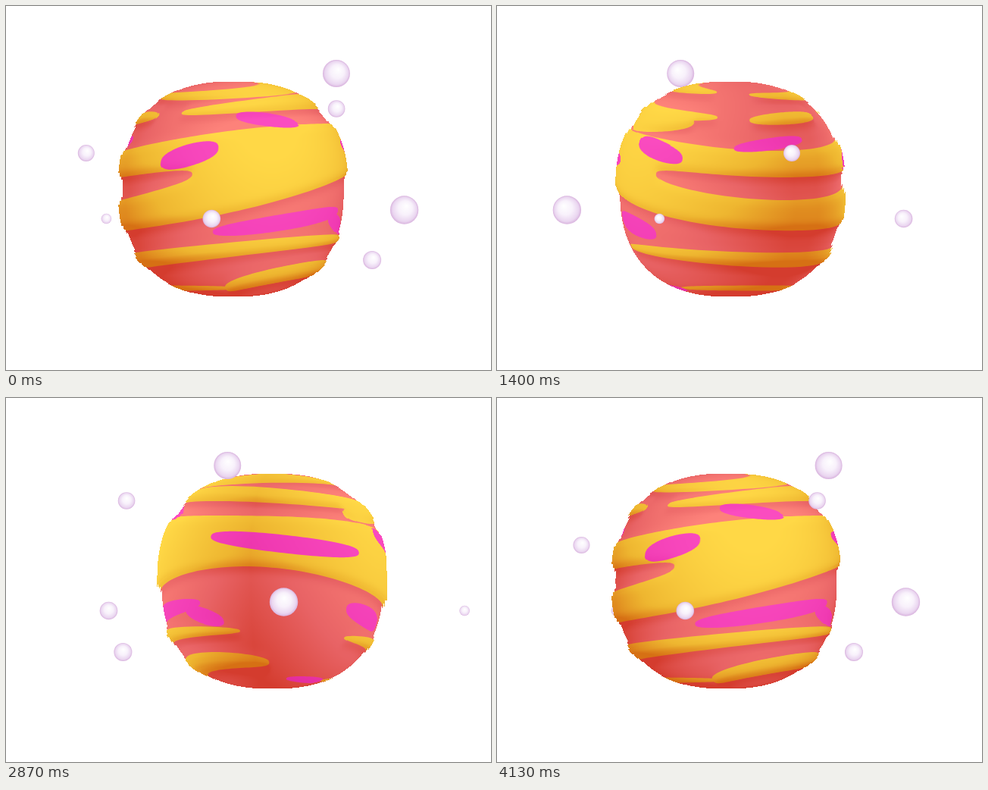
Animation of 640 by 480 pixels, one loop 4.2 s. Source, as an HTML page with a canvas:

```html
<!DOCTYPE html>
<html>
<head>
<meta charset="utf-8">
<title>Striped planet</title>
<style>
  html, body { margin: 0; width: 100%; height: 100%; overflow: hidden; background: #fff; }
  canvas { display: block; }
</style>
</head>
<body>
<canvas id="stage" width="640" height="480"></canvas>
<script>
const LOOP = 4200, STEP = 70, TAU = 2 * Math.PI;
const CY = 241.5, RX = 146, RY = 142, ROUND = 2.4, RELIEF = 7;
const ctx = document.getElementById('stage').getContext('2d');
const sin = deg => Math.sin(deg * TAU / 360), cos = deg => Math.cos(deg * TAU / 360);

// Surface map: x is longitude (padded by 20 degrees each side), y is the stage row
const SCALE = 3, PAD = 20, TOP = 90, MAP_W = (360 + 2 * PAD) * SCALE, MAP_H = 300;

function layer(w, h) {
  const c = document.createElement('canvas');
  c.width = w;
  c.height = h;
  return c.getContext('2d', { willReadFrequently: true });
}

const plot = (g, lon, y) => g.lineTo((lon + 180 + PAD) * SCALE, y - TOP);

// Rounded streak along the wave y + amp * sin(lon - phase)
function streak(g, mid, span, y, half, amp, phase = mid) {
  for (const shift of [-360, 0, 360]) {
    g.beginPath();
    for (let a = 0; a < 360; a += 3) {
      const lon = mid - span * cos(a), s = sin(a);
      plot(g, lon + shift, y + amp * sin(lon - phase) + half * Math.sign(s) * Math.abs(s) ** 0.75);
    }
    g.fill();
  }
}

// Wide belt running all the way round between two waves
const beltTop = lon => 169.5 - 18 * cos(lon - 84) - 3.5 * cos(2 * lon + 10);
const beltBottom = lon => 263 - 37 * cos(lon - 98) + 4 * cos(2 * lon - 30);

const stripes = layer(MAP_W, MAP_H);
stripes.beginPath();
for (let lon = -210; lon <= 210; lon += 3) plot(stripes, lon, beltTop(lon));
for (let lon = 210; lon >= -210; lon -= 3) plot(stripes, lon, beltBottom(lon));
stripes.fill();
stripes.globalCompositeOperation = 'destination-out';
streak(stripes, -91, 70, 212, 15, 29, -181);
stripes.globalCompositeOperation = 'source-over';
streak(stripes, 62, 165, 112, 7, 7, 210);
streak(stripes, 98, 134, 137, 10, 11, 165);
streak(stripes, 190, 28, 153, 13, 0);
streak(stripes, -82, 26, 148, 8, -7);
streak(stripes, -52, 148, 321, 10, -14, 0);
streak(stripes, -86, 96, 372, 3.5, 0);
streak(stripes, 52, 60, 371, 12, -25, -5);

const spots = layer(MAP_W, MAP_H);
streak(spots, -23.5, 16, 197, 15, -36);
streak(spots, -161, 16, 190, 13, 42);
streak(spots, -97, 21, 182, 8, -17);
streak(spots, 122, 42, 193, 12, 16);
streak(spots, 22, 20, 150, 9, 14);
streak(spots, 31, 42, 284, 11, -21);
streak(spots, 74, 13, 287, 11, 35);
streak(spots, 176, 19, 289, 14, 34);
streak(spots, 154, 26, 371.5, 4, 4);

const swell = layer(MAP_W, MAP_H);
swell.filter = 'blur(6px)';
swell.drawImage(stripes.canvas, 0, 0);

const alphaOf = g => g.getImageData(0, 0, MAP_W, MAP_H).data.filter((_, i) => i % 4 == 3);
const stripeMap = alphaOf(stripes), spotMap = alphaOf(spots), heightMap = alphaOf(swell);

const near = (map, u, v) => map[(v | 0) * MAP_W + (u | 0)] / 255;

function smooth(map, u, v) {
  const i = (v | 0) * MAP_W + (u | 0), f = u % 1;
  return (map[i] + (map[i + 1] - map[i]) * f) / 255;
}

// Dark, middle and lit tones
const CORAL = [[212, 60, 46], [232, 99, 101], [253, 130, 122]];
const YELLOW = [[214, 112, 20], [238, 182, 48], [255, 216, 70]];
const PINK = [[222, 40, 150], [240, 58, 178], [250, 76, 192]];

function tone(ramp, light, ch) {
  const k = light < 0.5 ? 0 : 1;
  return ramp[k][ch] + (ramp[k + 1][ch] - ramp[k][ch]) * (light * 2 - k);
}

// Two lamps turn with the planet; the undersides of raised stripes fall into shade
function lightAt(lon, dy, c, u, v) {
  const beam = Math.max(cos(lon - 20), 0.9 * cos(lon + 175), 0);
  const slope = near(heightMap, u, v + 5) - near(heightMap, u, v - 5);
  const light = 0.26 + 0.66 * c * beam ** 1.2 - 0.32 * dy + (slope < 0 ? 0.38 : 0.12) * slope;
  return Math.min(1, Math.max(0, light));
}

const planet = layer(640, 480), image = planet.createImageData(640, 480), px = image.data;

function paintPlanet(cx, turn) {
  px.fill(0);
  for (let y = 100; y < 383; y++) {
    const dy = (y + 0.5 - CY) / RY, v = y - TOP;
    const c = (1 - Math.abs(dy) ** ROUND) ** (1 / ROUND), w = RX * c;
    for (let x = Math.floor(cx - w - 6); x <= cx + w + 6; x++) {
      const dx = x + 0.5 - cx;
      // Test shells from the outside in, so raised stripes bulge at the rim
      for (let h = 6; h >= 0; h -= 2) {
        const s = dx / (w + h);
        if (Math.abs(s) >= 1) continue;
        const lon = Math.asin(s) * 360 / TAU - turn;
        const u = (((lon + 180) % 360 + 360) % 360 + PAD) * SCALE;
        if (near(heightMap, u, v) * RELIEF < h) continue;
        const light = lightAt(lon, dy, c, u, v);
        const stripe = smooth(stripeMap, u, v), spot = smooth(spotMap, u, v);
        const i = (y * 640 + x) * 4;
        for (let ch = 0; ch < 3; ch++) {
          let col = tone(CORAL, light, ch);
          col += (tone(YELLOW, light, ch) - col) * stripe;
          col += (tone(PINK, light, ch) - col) * spot;
          px[i + ch] = col;
        }
        px[i + 3] = 255;
        break;
      }
    }
  }
  planet.putImageData(image, 0, 0);
}

// Row, radius, orbit width, starting angle
const moons = [
  [89, 18, 118.5, 100.7], [135.5, 11.3, 170, 43.3], [194, 11, 218, -101.4], [280.5, 6.8, 296, -140.8],
  [280.5, 11.8, 228, -12.2], [269, 18.7, 251, 124.8], [335, 12, 196, 56.6]
];

function paintMoons(turn, front) {
  const glint = 0.25 * sin(2 * (turn + 20));
  for (const [y, r, orbit, start] of moons) {
    const a = turn + start;
    if (cos(a) > 0 != front) continue;
    const x = 319.5 + orbit * sin(a);
    const g = ctx.createRadialGradient(x + glint * r, y - 0.3 * r, 0, x, y, r);
    g.addColorStop(0, '#fff');
    g.addColorStop(0.5, '#f8f1fb');
    g.addColorStop(0.85, '#ead6f0');
    g.addColorStop(1, '#d9b4de');
    ctx.fillStyle = g;
    ctx.beginPath();
    ctx.arc(x, y, r, 0, TAU);
    ctx.fill();
  }
}

let shown = -1;
function frame() {
  const t = Math.floor(performance.now() / STEP) * STEP % LOOP;
  if (t != shown) {
    shown = t;
    const turn = 360 * t / LOOP;
    ctx.fillStyle = '#fff';
    ctx.fillRect(0, 0, 640, 480);
    paintMoons(turn, false);
    paintPlanet(320 - 32.5 * cos(turn - 51.4), turn);
    ctx.drawImage(planet.canvas, 0, 0);
    paintMoons(turn, true);
  }
  requestAnimationFrame(frame);
}
frame();
</script>
</body>
</html>
```
